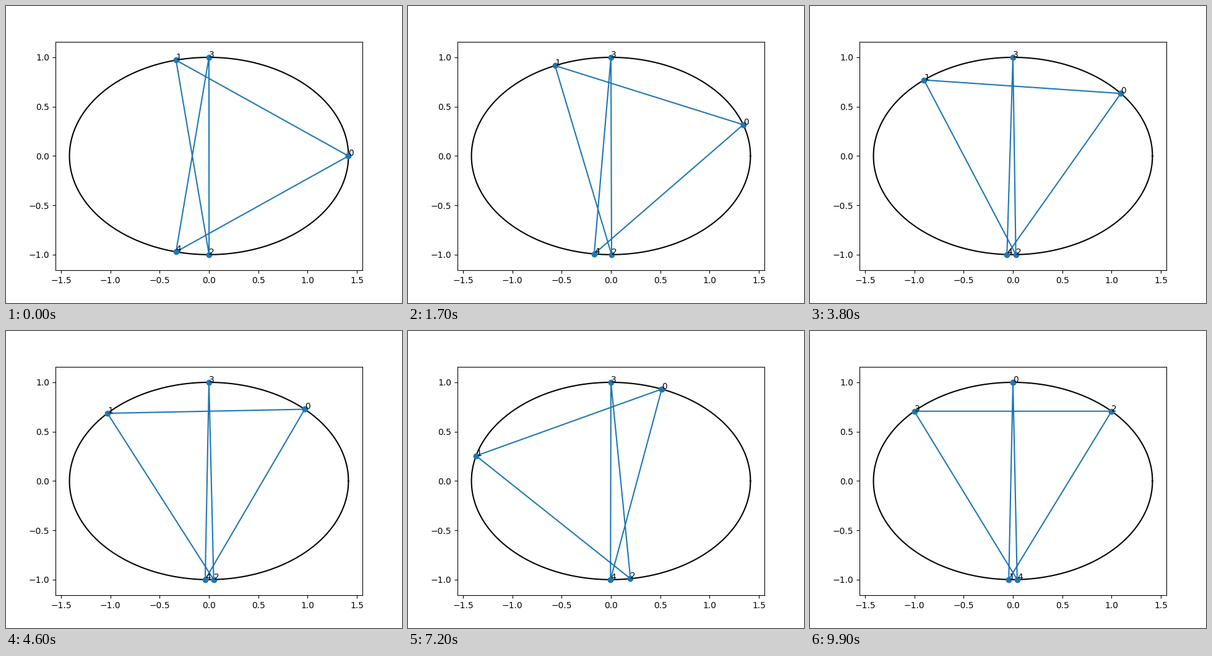
Write a matplotlib script that moves like this. It is 640x480 px and loops after 10 s.

```python
import numpy as np
import matplotlib.pyplot as plt
from matplotlib.animation import FuncAnimation

# Equilateral pentagram (side 2) sliding around the ellipse x^2/2 + y^2 = 1.
A, B = np.sqrt(2), 1.0
FRAMES, INTERVAL = 100, 100


def point(t):
    return A * np.cos(t), B * np.sin(t)


def ahead(t):
    """Parameter of the next ellipse point at chord length 2."""
    lo, hi = 0.0, np.pi / 4
    for _ in range(70):
        mid = (lo + hi) / 2
        if np.tan(mid) < abs(np.cos(t - mid)):
            lo = mid
        else:
            hi = mid
    return t + np.pi - lo - hi


def behind(t):
    return -ahead(-t)


# Vertex 0 runs at constant speed over a quarter of the ellipse and stops
# where the figure becomes symmetric about the y axis.
END = behind(behind(np.pi / 4)) % (2 * np.pi)
grid = np.linspace(0, END, 4001)
arc = np.concatenate([[0], np.cumsum(np.hypot(*np.diff(point(grid))))])
starts = np.interp(np.linspace(0, arc[-1], FRAMES), arc, grid)


def pentagon(t0):
    t1 = ahead(t0)
    t2 = ahead(t1)
    t3 = ahead(t2)
    # Near the top the forward step is ill-conditioned, so go back from t0.
    past_top = t3 % (2 * np.pi) > np.radians(91)
    t4 = ahead(t3) if past_top else behind(t0)
    return np.array([t0, t1, t2, t3, t4])


fig, ax = plt.subplots(figsize=(6.4, 4.8), dpi=100)
ax.plot(*point(np.linspace(0, 2 * np.pi, 1000)), "k")
star, = ax.plot([], [], "o-", color="C0")
labels = [ax.text(0, 0, str(i)) for i in range(5)]

half_w = 1.1 * A
half_h = half_w * (0.77 * 480) / (0.775 * 640)
ax.set_xlim(-half_w, half_w)
ax.set_ylim(-half_h, half_h)


def update(i):
    x, y = point(pentagon(starts[i]))
    star.set_data(np.append(x, x[0]), np.append(y, y[0]))
    for label, px, py in zip(labels, x, y):
        label.set_position((px, py))
    return [star, *labels]


anim = FuncAnimation(fig, update, frames=FRAMES, interval=INTERVAL,
                     repeat=True, repeat_delay=0)
plt.show()
```
